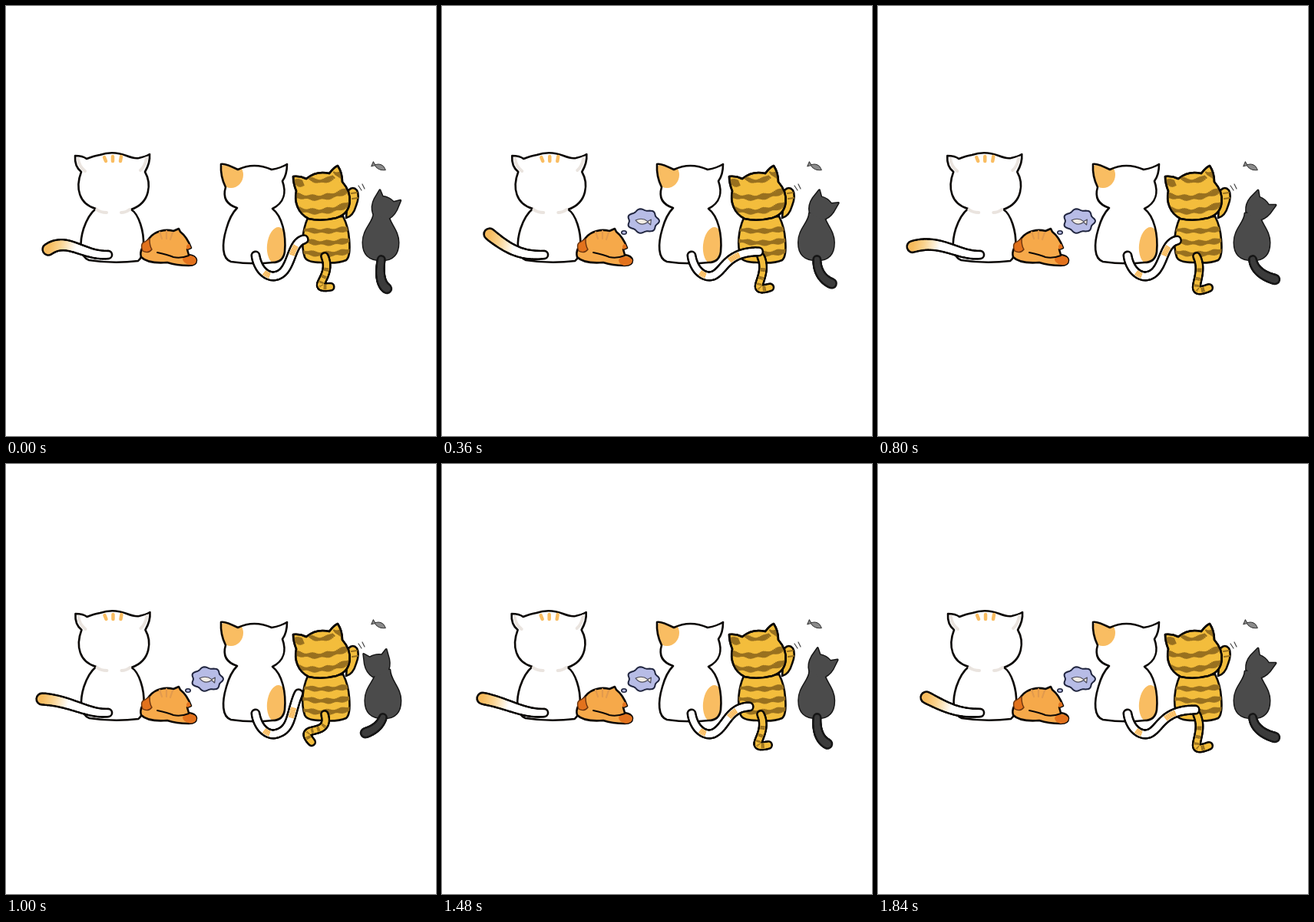
An HTML page with a canvas for the animation above (2000 ms loop, 560x560 px).

```html
<!DOCTYPE html>
<html lang="en">
<head>
<meta charset="utf-8">
<title>Cats in a row</title>
<style>
html, body { margin: 0; width: 100%; height: 100%; overflow: hidden; background: #fff; }
canvas { display: block; }
</style>
</head>
<body>
<canvas id="stage" width="560" height="560"></canvas>
<script>
const g = document.getElementById('stage').getContext('2d');
const INK = '#0b0806', ORANGE = '#f9bd62', LOOP = 2000, STEP = 40, LAST = 1840;
g.lineJoin = g.lineCap = 'round';

// Linear interpolation in rows of [x, value, value, ...].
function at(rows, x) {
  let i = 1;
  while (i < rows.length - 1 && rows[i][0] < x) i++;
  const [a, b] = [rows[i - 1], rows[i]];
  const k = Math.min(1, Math.max(0, (x - a[0]) / (b[0] - a[0])));
  return a.slice(1).map((v, j) => v + (b[j + 1] - v) * k);
}

function shape(d, fill, line = INK, width = 2.6) {
  const path = new Path2D(d);
  if (fill) { g.fillStyle = fill; g.fill(path); }
  if (line) { g.strokeStyle = line; g.lineWidth = width; g.stroke(path); }
}

function oval(x, y, rx, ry, fill, turn = 0) {
  g.fillStyle = fill;
  g.beginPath();
  g.ellipse(x, y, rx, ry, turn, 0, 7);
  g.fill();
}

function inside(d, draw) {
  g.save();
  g.clip(new Path2D(d));
  draw();
  g.restore();
}

function moved(x, y, turn, scale, draw) {
  g.save();
  g.translate(x, y);
  g.rotate(turn);
  g.scale(scale, scale);
  draw();
  g.restore();
}

function curve(p, n = 28) {
  return Array.from({ length: n + 1 }, (_, i) => {
    const t = i / n, s = 1 - t;
    return [0, 1].map(k => s * s * s * p[k] + 3 * s * s * t * p[k + 2] + 3 * s * t * t * p[k + 4] + t * t * t * p[k + 6]);
  });
}

// A round-ended band along points whose half width runs from a to b.
function ribbon(pts, a, b, fill, line = INK) {
  const pass = (color, extra) => {
    g.strokeStyle = color;
    for (let i = 1; i < pts.length; i++) {
      g.lineWidth = 2 * (a + (b - a) * i / pts.length) + extra;
      g.beginPath();
      g.moveTo(...pts[i - 1]);
      g.lineTo(...pts[i]);
      g.stroke();
    }
  };
  if (line) pass(line, 2.6);
  pass(fill, -2.6);
}

function band(pts, from, to, half, color) {
  g.lineCap = 'butt';
  ribbon(pts.slice(from, to), half, half, color, null);
  g.lineCap = 'round';
}

// Rough fur stripe sagging between two ends.
function fur(x1, y1, x2, y2, sag, h) {
  g.strokeStyle = '#98701f';
  g.lineWidth = 2.2;
  g.beginPath();
  for (let x = x1; x < x2; x += 2) {
    const k = (x - x1) / (x2 - x1);
    const y = y1 + (y2 - y1) * k + sag * 4 * k * (1 - k);
    const r = h * (.75 + .35 * Math.sin(x * 12.9));
    g.moveTo(x - 1, y - r);
    g.lineTo(x + 1.5, y + r);
  }
  g.stroke();
}

// Time tables: white tail, calico tail, tabby and black cat sway, thought bubble.
const WHITE = [[0, 0], [200, 1], [560, .66], [840, .1], [1000, .3], [1280, .76], [1640, .2], [1840, .7]];
const CALICO = [[0, .35], [200, .65], [340, 1], [560, .84], [1000, 0], [1280, .85], [1400, 1], [1560, .3], [1640, .48], [1840, 1]];
const SWAY = [[0, .75], [200, 0], [380, 1], [560, .15], [640, 0], [800, 1], [1000, .03], [1280, .6], [1640, 1], [1840, 1]];
const BUBBLE = [[80, .2, 236, 295], [200, .55, 245, 290], [360, 1, 262, 280]];

const WHITE_TAIL = [
  [0, 100, 326, 80, 300, 55, 317],
  [.2, 105, 326, 82, 303, 44, 313],
  [.3, 106, 326, 84, 308, 47, 306],
  [.7, 105, 325, 90, 318, 63, 304],
  [1, 108, 326, 90, 322, 61, 290]];
const CALICO_TAIL = [
  [0, 373, 345, 370, 325, 381, 299],
  [.35, 373, 345, 370, 308, 388, 304],
  [.65, 370, 344, 372, 317, 400, 316],
  [1, 368, 345, 370, 320, 413, 320]];
const TABBY_TAIL = [
  [0, 424, 358, 376, 336, 397, 362],
  [1, 428, 352, 398, 380, 431, 367]];
const BLACK_TAIL = [
  [0, 487, 340, 478, 346, 466, 350],
  [.15, 489, 340, 486, 348, 476, 351],
  [.6, 486, 342, 484, 352, 497, 352],
  [.75, 486, 346, 487, 362, 496, 368],
  [1, 490, 344, 502, 352, 517, 356]];

const WHITE_CAT = 'M90 195Q100 195 105 199Q115 195 122 194Q139 188 157 195Q167 199 173 198Q182 196 187 193' +
  'Q188 204 181 216C189 230 189 256 163 265C173 271 180 294 179 312Q178 328 172 332Q140 336 108 331' +
  'C95 326 96 306 101 290Q107 272 117 264C95 258 90 237 98 216Q89 209 90 195Z';
const CALICO_CAT = 'M280 206Q284 204 302 213Q323 203 346 213Q358 211 366 206Q366 220 360 228' +
  'C365 242 363 256 347 264C360 274 365 298 363 320Q361 334 347 334Q320 337 293 333' +
  'C281 329 281 310 287 290Q292 272 301 263Q280 256 286 236Q279 222 280 206Z';
const TABBY_HEAD = 'M378 241Q374 231 374 222Q383 221 391 225Q404 214 421 218Q427 210 432 208Q438 217 438 229' +
  'C453 246 451 270 430 276Q410 281 394 277C380 270 375 255 378 241Z';
const TABBY_BODY = 'M393 276C386 292 384 312 389 327Q392 334 410 334Q432 336 443 331Q449 326 447 304Q446 288 439 274Z';
const KITTEN = 'M176 327C173 317 181 310 187 302C194 293 208 290 218 293L225 290L227 294Q236 301 241 315' +
  'L236 317L238 324Q247 325 248 331Q248 338 238 338Q222 338 210 334Q185 336 176 327Z';

function whiteCat(w) {
  moved(1.5 * w, 0, 0, 1, () => {
    shape(WHITE_CAT, '#fff');
    inside(WHITE_CAT, () => {
      shape('M94 199Q95 209 103 215M183 198Q181 209 175 214M118 265Q123 269 131 269M161 265Q156 269 150 269', null, '#eae4df', 4);
    });
    shape('M128 197L130 202M139 196V202M150 196L149 202', null, ORANGE, 4.5);
  });
  const [c1x, c1y, c2x, c2y, x, y] = at(WHITE_TAIL, w);
  const fill = g.createLinearGradient(x, y, x + 34, y + 8);
  fill.addColorStop(0, '#f7bb5d');
  fill.addColorStop(.4, '#fad38f');
  fill.addColorStop(1, '#fff');
  ribbon(curve([133, 324, c1x, c1y, c2x, c2y, x, y]), 5, 7.5, fill);
}

function kitten(w) {
  shape(KITTEN, '#f6a94a');
  inside(KITTEN, () => {
    oval(240, 331 + 2 * w, 10, 6, '#e2721d', .2);
    oval(239, 314, 4, 4, '#e2721d');
    shape('M200 294L203 303M209 293V303M217 295L214 304', null, '#e29a4d', 2.2);
  });
  shape('M178 319Q174 309 181 307L187 303Q187 313 190 317Q185 323 178 319Z', '#e2721d', '#6b3510', 1.4);
  shape('M197 321Q211 324 218 327Q228 329 238 325', null, INK, 2);
}

function calicoCat() {
  shape(CALICO_CAT, '#fff', null);
  inside(CALICO_CAT, () => {
    oval(293, 220, 16, 17, ORANGE);
    oval(353, 312, 13, 24, ORANGE, .1);
  });
  shape(CALICO_CAT);
}

function calicoTail(u) {
  const pts = [...curve([325, 325, 328, 345, 342, 355, 353, 351], 18), ...curve([353, 351, ...at(CALICO_TAIL, u)], 28)];
  ribbon(pts, 5.2, 5.4, '#fff');
  band(pts, 9, 14, 5, ORANGE);
  band(pts, 34, 41, 5, ORANGE);
}

function tabby(v) {
  const fill = '#f3bd3c';
  shape('M446 240Q452 234 457 240Q461 247 456 260Q452 274 443 276Z', fill);
  shape('M450 244L457 243M451 251L458 250', null, '#98701f', 2);
  shape(TABBY_BODY, fill);
  inside(TABBY_BODY, () => {
    fur(386, 291, 449, 289, 3, 2.6);
    fur(385, 305, 450, 304, 4, 2.8);
    fur(385, 320, 450, 318, 4, 2.8);
  });
  shape(TABBY_HEAD, fill);
  inside(TABBY_HEAD, () => {
    fur(394, 224, 427, 222, 5, 2.4);
    fur(376, 246, 449, 238, 7, 3);
    fur(378, 264, 450, 256, 7, 3);
    fur(374, 229, 388, 230, 1, 4);
    fur(428, 218, 438, 220, 1, 4);
  });
  shape(TABBY_HEAD);
  const pts = curve([415, 326, ...at(TABBY_TAIL, v)], 30);
  ribbon(pts, 4.6, 4.8, fill);
  for (let i = 6; i < 30; i += 5) band(pts, i, i + 3, 4.4, '#98701f');
}

function blackCat(v) {
  const head = 'M-15 -24L-8 -18Q0 -21 8 -18L15 -24L16 -11Q16 0 9 7L-9 7Q-16 0 -16 -11Z';
  const body = 'M482 270C482 282 468 290 468 308C468 325 478 331 492 331C506 331 514 324 514 308C514 291 500 282 500 268Z';
  const fill = '#4b4b4b', line = '#171717';
  const both = (f, l) => {
    moved(-4 * v, 0, 0, 1, () => shape(body, f, l, 3));
    moved(485 + 6 * v, 268, (-13 + 53 * v) * Math.PI / 180, 1, () => shape(head, f, l, 3));
  };
  both(null, line);
  both(fill, null);
  ribbon(curve([491 - 3 * v, 330, ...at(BLACK_TAIL, v)]), 4.6, 6, '#3c3c3c', line);
}

function fish(fill, line, width) {
  shape('M-10 -3L-6 0Q2 -7 10 1Q2 6 -6 1L-10 4Z', fill, line, width);
}

function bubble(t) {
  if (t < 80) return;
  const [size, x, y] = at(BUBBLE, t);
  const edge = Array.from({ length: 72 }, (_, i) => {
    const a = i * Math.PI / 36, r = .93 + .07 * Math.cos(7 * a);
    return `${21 * r * Math.cos(a)} ${16 * r * Math.sin(a)}`;
  });
  moved(x, y, 0, size, () => {
    shape(`M${edge.join('L')}Z`, '#b7bce6', '#20253f', 2);
    moved(0, 1, Math.PI + .1, 1, () => fish('#f3eee6', '#4a4a58', 1.2));
  });
  const dot = 4 * Math.min(1, .4 + size * .6);
  oval(231 + 6 * size, 298 - 3 * size, dot, dot * .75, '#20253f');
  oval(231 + 6 * size, 298 - 3 * size, dot - 1.6, dot * .75 - 1.4, '#b7bce6');
}

function draw(t) {
  const [w] = at(WHITE, t), [u] = at(CALICO, t), [v] = at(SWAY, t);
  g.fillStyle = '#fff';
  g.fillRect(0, 0, 560, 560);
  whiteCat(w);
  kitten(w);
  bubble(t);
  calicoCat();
  tabby(v);
  calicoTail(u);
  blackCat(v);
  moved(486, 209, .4, .95, () => fish('#8a8a8a', '#333', 1));
  shape('M459 234L463 240M464 232L467 238', null, '#444', 1.2);
}

const start = performance.now();
function tick(now) {
  const t = Math.max(0, now - start) % LOOP;
  draw(Math.min(LAST, Math.floor(t / STEP) * STEP));
  requestAnimationFrame(tick);
}
tick(start);
</script>
</body>
</html>
```
